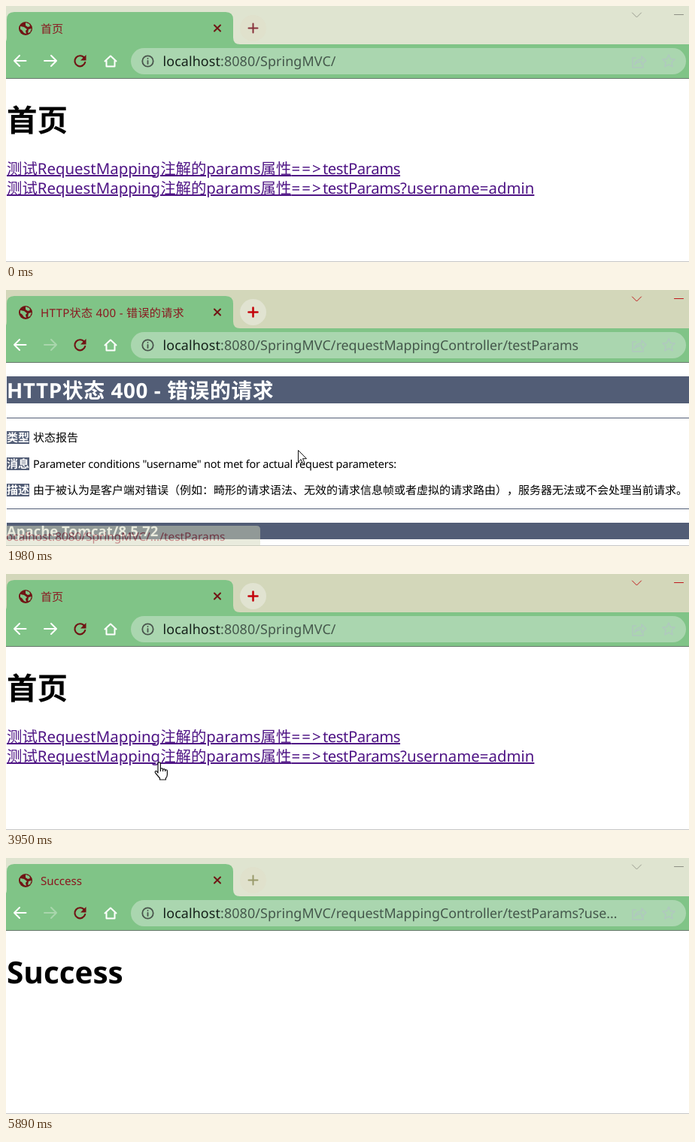
Animation of 908x341 px, one loop 5950 ms. Source, as an HTML page:

```html
<!DOCTYPE html>
<html lang="zh-CN">
<head>
<meta charset="utf-8">
<title>首页</title>
<style>
  html, body { margin: 0; width: 100%; height: 100%; overflow: hidden; background: #fff; }
  body {
    position: relative;
    font-family: "Noto Sans", "Noto Sans CJK SC", sans-serif;
    text-rendering: geometricPrecision;
    text-spacing-trim: space-all;
  }
  svg { position: absolute; left: 0; top: 0; display: block; }
  text { white-space: pre; }

  .line { fill: none; stroke-linecap: round; stroke-linejoin: round; }
  .white { stroke: #fff; stroke-width: 2; }
  .dim { stroke: #a9d6ac; stroke-width: 2; }
  .wine { fill: #701414; }
  .title { font-size: 15.1px; fill: #8a1820; }
  .url { font-size: 17.9px; fill: #44574b; letter-spacing: -.07px; }
  .root { letter-spacing: .1px; }
  .host { fill: #15211a; }
  .big { font-size: 40.5px; font-weight: bold; }
  .body { font-size: 15px; }
  .slate { fill: #525d76; }
  .light { font-weight: bold; fill: #fff; }
  .hint { font-size: 15.4px; fill: #8f1212; }

  .links {
    position: absolute; left: 1px; top: 203px; margin: 0;
    font-size: 20.4px; line-height: 26px; white-space: nowrap;
  }
  .links a {
    color: #4f1585; text-decoration: underline;
    text-decoration-thickness: 1.5px; text-underline-offset: 1px;
  }
  .links i { font-style: normal; letter-spacing: 2.2px; }
  .links b { font-weight: normal; letter-spacing: -.5px; }

  /* Timeline: one loop, mostly hard switches */
  .home, .error, .success, .loading, .ready, .failed, .done,
  .awake, .idle, .asleep, .hover, .hand, .arrow, .away,
  .hint1, .hint2, .cursor { animation: 5.95s step-end infinite; }

  .home { animation-name: home; }
  .error { animation-name: error; }
  .success { animation-name: success; }
  .loading { animation-name: loading; }
  .ready { animation-name: ready; }
  .failed { animation-name: failed; }
  .done { animation-name: done; }
  .awake { animation-name: awake; }
  .idle { animation-name: idle; }
  .asleep { animation-name: asleep; }
  .away { animation-name: away; }
  .hover { animation-name: hover; }
  .hand { animation-name: hand; }
  .arrow { animation-name: arrow; }
  .hint1 { animation-name: hint1; }
  .hint2 { animation-name: hint2; }
  .cursor { animation-name: move; }

  @keyframes home { 0%, 52.94% { visibility: visible } 27.23%, 71.93% { visibility: hidden } }
  @keyframes away { 0%, 52.94% { visibility: hidden } 27.23%, 71.93% { visibility: visible } }
  @keyframes error { 0%, 52.94% { visibility: hidden } 27.23% { visibility: visible } }
  @keyframes success { 0% { visibility: hidden } 71.93% { visibility: visible } }
  @keyframes loading { 0%, 30.76%, 77.9% { visibility: hidden } 27.23%, 71.93% { visibility: visible } }
  @keyframes ready { 0%, 30.76%, 77.9% { visibility: visible } 27.23%, 71.93% { visibility: hidden } }
  @keyframes failed { 0%, 52.94% { visibility: hidden } 30.76% { visibility: visible } }
  @keyframes done { 0% { visibility: hidden } 77.9% { visibility: visible } }
  @keyframes awake { 0%, 98.95% { visibility: hidden } 25.04% { visibility: visible } }
  @keyframes idle { 0% { visibility: visible } 25.04% { visibility: hidden } }
  @keyframes asleep { 0% { visibility: hidden } 98.95% { visibility: visible } }
  @keyframes hover { 0%, 56.9% { visibility: hidden } 47.3% { visibility: visible } }
  @keyframes hand { 0%, 27.23%, 71.93% { visibility: hidden } 18.9%, 64% { visibility: visible } }
  @keyframes arrow { 0%, 27.23%, 71.93% { visibility: visible } 18.9%, 64% { visibility: hidden } }

  @keyframes hint1 {
    0% { opacity: 0 }
    25.04% { opacity: 1 }
    32.1% { opacity: 1; animation-timing-function: linear }
    34.45%, 100% { opacity: 0 }
  }
  @keyframes hint2 {
    0% { opacity: 0 }
    69.75% { opacity: 1 }
    79.16% { opacity: 1; animation-timing-function: linear }
    81.5%, 100% { opacity: 0 }
  }
  @keyframes move {
    0% { transform: translate(744px, 344px) }
    11.13% { transform: translate(744px, 344px); animation-timing-function: steps(9) }
    21.34% { transform: translate(391px, 217px) }
    22.52% { transform: translate(388px, 213px) }
    34.49% { transform: translate(388px, 213px); animation-timing-function: steps(9) }
    45.04% { transform: translate(33px, 91px); animation-timing-function: steps(2) }
    47.39% { transform: translate(5px, 78px) }
    53.45% { transform: translate(5px, 78px); animation-timing-function: steps(2) }
    55.8% { transform: translate(11px, 65px); animation-timing-function: steps(9) }
    66.38% { transform: translate(203px, 250px) }
    72.27% { transform: translate(213px, 241px) }
    75.8% { transform: translate(213px, 241px); animation-timing-function: steps(2) }
    77.98% { transform: translate(220px, 246px); animation-timing-function: steps(8) }
    88.57% { transform: translate(623px, 304px); animation-timing-function: steps(4) }
    93.28%, 100% { transform: translate(790px, 345px) }
  }
</style>
</head>
<body>
<svg width="908" height="341" viewBox="0 0 908 341">
  <defs>
    <linearGradient id="fade" gradientUnits="userSpaceOnUse" x1="236" y1="0" x2="264" y2="0">
      <stop stop-color="#8a1820"/>
      <stop offset="1" stop-color="#8a1820" stop-opacity="0"/>
    </linearGradient>
    <path id="plus" d="M322.500 29.500h12M328.500 23.500v12"/>
    <path id="chevron" d="M832.500 9l6 6 6-6"/>
    <path id="minus" d="M888.500 11.500h12"/>
    <path id="forward" d="M51 73h16M60 66l7 7-7 7"/>
  </defs>

  <!-- Tab strip -->
  <rect width="908" height="52" fill="#dfe4d0"/>
  <g class="idle line">
    <circle cx="328.500" cy="29.500" r="17.500" fill="#e0e1cc"/>
    <use href="#plus" stroke="#87303a" stroke-width="2"/>
    <use href="#chevron" stroke="#9a9c90"/>
    <use href="#minus" stroke="#8d8f84"/>
  </g>
  <g class="asleep line">
    <circle cx="328.500" cy="29.500" r="17.500" fill="#e0e1cc"/>
    <use href="#plus" stroke="#999a6a" stroke-width="2"/>
    <use href="#chevron" stroke="#9a9c90"/>
    <use href="#minus" stroke="#8d8f84"/>
  </g>
  <g class="awake line">
    <rect width="908" height="52" fill="#d3d7ba"/>
    <circle cx="328.500" cy="29.500" r="17.500" fill="#e1e3d1"/>
    <use href="#plus" stroke="#c4050c" stroke-width="2.600"/>
    <use href="#chevron" stroke="#c0181c"/>
    <use href="#minus" stroke="#c0181c"/>
  </g>
  <path d="M-8 52Q1 51 1 42V18Q1 8 11 8H292Q302 8 302 18V42Q302 51 311 51V52Z" fill="#80c487"/>
  <g class="ready">
    <circle class="wine" cx="26" cy="30" r="9"/>
    <path d="M19 27l5 1 4 3-2 2 1 4-3-1-3-4-2-1zM26 22l5 2 1 3-3 1-3-2zM30 31l4-1-2 5-3 1z" fill="#80c487"/>
  </g>
  <circle class="loading" cx="27" cy="21.500" r="1.500" fill="#4d8f94"/>
  <text class="title home" x="46" y="35.500">首页</text>
  <text class="title loading" x="46" y="35.500" style="fill:url(#fade)">localhost:8080/SpringMVC/request</text>
  <text class="title failed" x="46" y="35.500" letter-spacing=".3">HTTP状态 400 - 错误的请求</text>
  <text class="title done" x="46" y="35.500">Success</text>
  <path class="line" d="M277 25.500l8 8m0-8l-8 8" stroke="#701414" stroke-width="2"/>

  <!-- Toolbar -->
  <rect y="51" width="908" height="46" fill="#80c487"/>
  <rect y="96" width="908" height="1" fill="#66776a"/>
  <circle class="hover" cx="18.500" cy="73" r="17.500" fill="#6fad78"/>
  <path class="line white" d="M26.500 73h-15.500M18 66l-7 7 7 7"/>
  <use class="line white home" href="#forward"/>
  <use class="line dim away" href="#forward"/>
  <g class="ready">
    <path class="line" d="M104 69a7 7 0 1 0 1.200 6" stroke="#701414" stroke-width="2.200"/>
    <path class="wine" d="M106.500 65v7.500H99z"/>
  </g>
  <path class="line loading" d="M91.500 66.500l13 13m0-13l-13 13" stroke="#222a24" stroke-width="2.200"/>
  <path class="line white" d="M131.500 73.500l7.500-7 7.500 7M133.500 72.500v8h11v-8"/>
  <rect x="166" y="56" width="738" height="35" rx="17.500" fill="#aad6af"/>
  <g class="line" stroke="#4a554d" stroke-width="1.800">
    <circle cx="188.500" cy="73.500" r="7.200"/>
    <path d="M188.500 73v4M188.500 70v.1"/>
  </g>
  <g class="line" stroke="#b0c8bf" stroke-width="1.500">
    <path d="M837 69h-4v13h14v-4M836 78q1-7 9-7v-4l6 6-6 5v-4q-6 0-9 4z"/>
    <path d="M881 65l2.400 5.400 5.800.6-4.300 4 1.200 5.800-5.100-3-5.100 3 1.200-5.800-4.300-4 5.800-.6z"/>
  </g>
  <text class="url home" x="208.500" y="80"><tspan class="root"><tspan class="host">localhost</tspan>:8080/SpringMVC/</tspan></text>
  <text class="url error" x="208.500" y="80"><tspan class="root"><tspan class="host">localhost</tspan>:8080/SpringMVC/</tspan>requestMappingController/testParams</text>
  <text class="url success" x="208.500" y="80"><tspan class="root"><tspan class="host">localhost</tspan>:8080/SpringMVC/</tspan>requestMappingController/testParams?use...</text>

  <!-- Pages -->
  <text class="big home" x="1" y="166.500">首页</text>
  <text class="big success" x="1" y="167">Success</text>
  <g class="error">
    <path class="slate" d="M1 115h907v36H1zM1 170h907v1H1zM1 291h907v1H1zM1 310h907v22H1zM1 188h30v17H1zM1 223h30v17H1zM1 258h30v17H1z"/>
    <text class="light" x="1" y="144" font-size="27.800" letter-spacing=".6">HTTP状态 400 - 错误的请求</text>
    <g class="body light">
      <text x="1" y="202">类型</text>
      <text x="1" y="237">消息</text>
      <text x="1" y="272">描述</text>
    </g>
    <g class="body">
      <text x="36" y="202">状态报告</text>
      <text x="36" y="237" style="font-size:14.5px" letter-spacing="-.23">Parameter conditions "username" not met for actual request parameters:</text>
      <text x="36" y="272">由于被认为是客户端对错误（例如：畸形的请求语法、无效的请求信息帧或者虚拟的请求路由），服务器无法或不会处理当前请求。</text>
    </g>
    <text class="light" x="1" y="328" font-size="18.500">Apache Tomcat/8.5.72</text>
  </g>
  <rect y="340" width="908" height="1" fill="#c6c6c6"/>

  <!-- Link address bubbles -->
  <g class="hint hint1">
    <path d="M0 314h333q5 0 5 5v22H0z" fill="#d3d7ba"/>
    <text x="-4" y="334">localhost:8080/SpringMVC/.../testParams</text>
  </g>
  <g class="hint hint2">
    <path d="M0 314h333q5 0 5 5v22H0z" fill="#d3d7ba"/>
    <text x="-4" y="334">localhost:8080/SpringMVC/.../testParams?us...</text>
  </g>
</svg>

<p class="links home">
  <a>测试RequestMapping注解的params属性<i>==&gt;</i><b>testParams</b></a><br>
  <a>测试RequestMapping注解的params属性<i>==&gt;</i><b>testParams</b>?username=admin</a>
</p>

<svg width="908" height="341" viewBox="0 0 908 341">
  <g class="cursor" fill="#fff" stroke="#111" stroke-linejoin="round">
    <path class="arrow" d="M.5.5V16l3.600-3.400 2.500 5.900 2.400-1-2.500-5.800h5z"/>
    <path class="hand" transform="translate(-6 0)" stroke-width="1.200" d="M5 15V2.500a1.700 1.700 0 0 1 3.400 0V9.200q3-1 3.200 1 2.600-1 3 .8 2.800-.6 2.800 1.600V17q0 3-2 5v2H7.500v-2L2 15.500q-1.600-2.200 0-3 1.400-.6 3 2.500ZM8.400 9v4M11.600 10v3M14.600 11v2"/>
  </g>
</svg>
</body>
</html>
```
